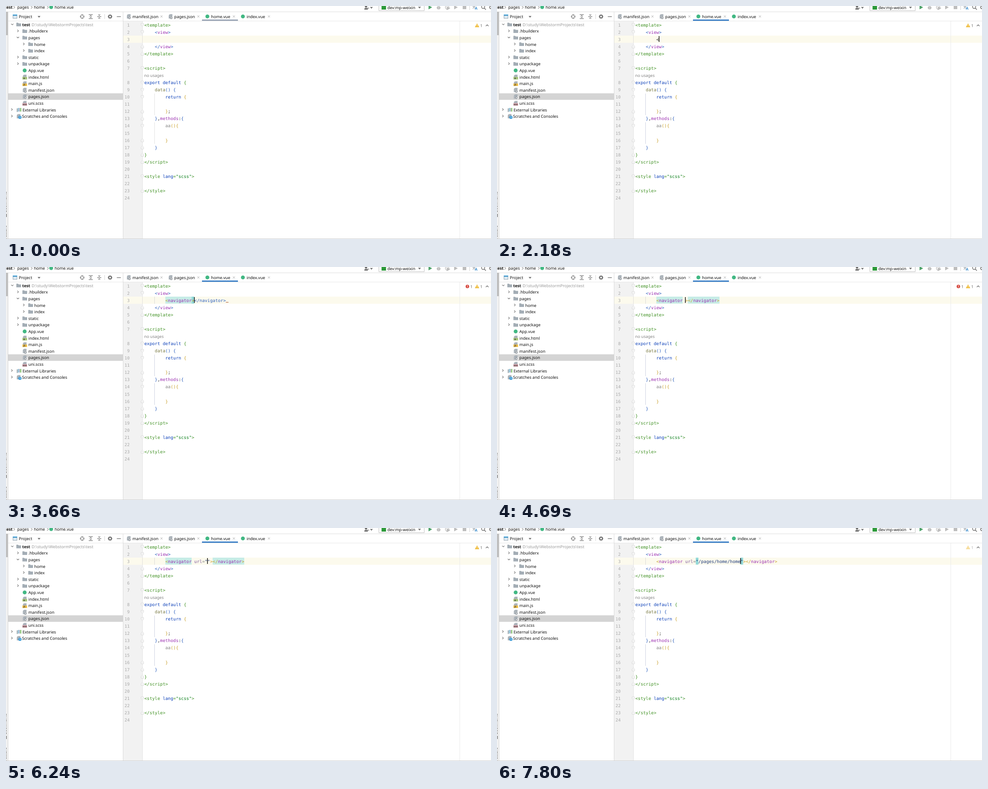
An HTML page with a canvas for the animation above (8 s loop, 1079 by 519 pixels).

```html
<!DOCTYPE html>
<html lang="en">
<head>
<meta charset="utf-8">
<title>Editor typing demo</title>
<style>
html, body { margin: 0; width: 100%; height: 100%; overflow: hidden; background: #fff; }
canvas { display: block; }
</style>
</head>
<body>
<canvas id="stage" width="1079" height="519"></canvas>
<script>
const ctx = document.getElementById('stage').getContext('2d');
const LOOP = 8000, W = 1079, H = 519;
const UI = '"Noto Sans", "Open Sans", sans-serif';
const MONO = '"DejaVu Sans Mono", monospace';
const CELL = 5.85, CODE_X = 307.7, ROW_H = 16.07;
const INK = {
  g: '#3f9022', b: '#2c5fbd', a: '#c9a02c', p: '#9b2fb0', k: '#0b3fb8',
  d: '#222', o: '#7a7a43', y: '#858585', s: '#067d17', n: '#1f3a7a', u: '#7f5a9c'
};

const colX = col => CODE_X + col * CELL;
const rowY = row => 42 + row * ROW_H;

// ---------- drawing helpers ----------
function rect(x, y, w, h, color) {
  ctx.fillStyle = color;
  ctx.fillRect(x, y, w, h);
}
function path(points, color, fill, width = 1) {
  ctx.beginPath();
  points.forEach(([x, y], i) => i ? ctx.lineTo(x, y) : ctx.moveTo(x, y));
  if (fill) { ctx.closePath(); ctx.fillStyle = color; ctx.fill(); }
  else { ctx.strokeStyle = color; ctx.lineWidth = width; ctx.stroke(); }
}
function dot(x, y, r, color, width) {
  ctx.beginPath();
  ctx.arc(x, y, r, 0, 7);
  if (width) { ctx.strokeStyle = color; ctx.lineWidth = width; ctx.stroke(); }
  else { ctx.fillStyle = color; ctx.fill(); }
}
function label(str, x, y, color = '#111', size = 9.1, weight = '') {
  ctx.font = `${weight} ${size}px ${UI}`;
  ctx.fillStyle = color;
  ctx.fillText(str, x, y + size * 0.36);
}
// Monospaced text, one glyph per grid cell.
function mono(str, x, y, color) {
  ctx.font = `9.7px ${MONO}`;
  ctx.fillStyle = color;
  [...str].forEach((ch, i) => ch !== ' ' && ctx.fillText(ch, x + i * CELL, y + 3.5));
}
// Segments are split by "~"; the first letter of each picks its ink.
function code(segments, col, row) {
  if (!segments) return;
  for (const seg of segments.split('~')) {
    mono(seg.slice(1), colX(col), rowY(row), INK[seg[0]]);
    col += seg.length - 1;
  }
}
const plain = segments => segments.split('~').map(s => s.slice(1)).join('');

function chevron(x, y, dir, color = '#6e6e6e', s = 2.5) {
  const pts = {
    right: [[-s / 2, -s], [s / 2, 0], [-s / 2, s]],
    down: [[-s, -s / 2], [0, s / 2], [s, -s / 2]],
    up: [[-s, s / 2], [0, -s / 2], [s, s / 2]]
  }[dir];
  path(pts.map(([a, b]) => [x + a, y + b]), color, false, 1.1);
}
const caretDown = (x, y) => path([[x - 3.2, y - 1.8], [x + 3.2, y - 1.8], [x, y + 2]], '#6e6e6e', true);
const playMark = (x, y, color) => path([[x - 3.5, y - 4.5], [x + 4.5, y], [x - 3.5, y + 4.5]], color, true);
function cross(x, y) {
  path([[x - 2.3, y - 2.3], [x + 2.3, y + 2.3]], '#b0b0b0');
  path([[x + 2.3, y - 2.3], [x - 2.3, y + 2.3]], '#b0b0b0');
}
function folder(x, y) {
  path([[x, y - 4], [x + 4, y - 4], [x + 5.3, y - 2.6], [x + 10.5, y - 2.6], [x + 10.5, y + 4], [x, y + 4]], '#a3adb5', true);
}
function icon(kind, x, y) {
  if (kind === 'folder') return folder(x, y);
  if (kind === 'vue') return dot(x + 5, y, 4.3, '#41b883');
  if (kind === 'libs') {
    ['#8f9aa3', '#62a7c9', '#8f9aa3', '#62b543'].forEach((c, i) => rect(x + i * 2.7, y - 4 + (i === 0), 1.7, 8, c));
    return;
  }
  path([[x + 4, y - 5], [x + 9.2, y - 5], [x + 9.2, y + 4.5], [x + 1, y + 4.5], [x + 1, y - 2]], '#aab2b9', true);
  path([[x + 1, y - 3], [x + 3.2, y - 5], [x + 3.2, y - 3]], '#aab2b9', true);
  if (kind === 'scratch') {
    dot(x + 8, y + 2.3, 3.6, '#3d9bd6');
    path([[x + 8, y + 0.5], [x + 8, y + 2.6], [x + 9.6, y + 2.6]], '#fff', false, 0.8);
  } else if (kind === 'json') {
    rect(x + 4, y - 0.5, 6.5, 6, '#f4f4f4');
    label('{}', x + 3.8, y + 2, '#55606a', 7, 'bold');
  } else {
    const [text, bg] = { html: ['H', '#a9c77c'], js: ['JS', '#f0c04a'], scss: ['SASS', '#d9a5ad'] }[kind];
    rect(x, y, 10.5, 5.5, bg);
    label(text, x + (text.length > 2 ? 0.4 : 2), y + 2.7, '#333', text.length > 2 ? 4 : 5, 'bold');
  }
}

// ---------- static content ----------
const TREE = [
  ['down', 14, 'folder', 23, ''],
  ['right', 26.5, 'folder', 36.5, '.hbuilderx'],
  ['down', 26.5, 'folder', 36.5, 'pages'],
  ['right', 39.5, 'folder', 49.5, 'home'],
  ['right', 39.5, 'folder', 49.5, 'index'],
  ['right', 26.5, 'folder', 36.5, 'static'],
  ['right', 26.5, 'folder', 36.5, 'unpackage'],
  ['', 0, 'vue', 36.5, 'App.vue'],
  ['', 0, 'html', 36.5, 'index.html'],
  ['', 0, 'js', 36.5, 'main.js'],
  ['', 0, 'json', 36.5, 'manifest.json'],
  ['', 0, 'json', 36.5, 'pages.json'],
  ['', 0, 'scss', 36.5, 'uni.scss'],
  ['right', 13, 'libs', 24, 'External Libraries'],
  ['right', 13, 'scratch', 23, 'Scratches and Consoles']
];
const TABS = [['json', 268, 'manifest.json', 346], ['json', 361, 'pages.json', 428],
  ['vue', 443, 'home.vue', 507], ['vue', 522, 'index.vue', 585]];
// row, column, segments
const CODE = [
  [0, 0, 'g<template>'], [1, 4, 'b<~pview~b>'], [3, 4, 'b</~pview~b>'], [4, 0, 'g</template>'],
  [6, 0, 'g<script>'], [8, 0, 'kexport default ~g{'], [9, 4, 'odata~b() {'], [10, 8, 'kreturn ~a{'],
  [12, 8, 'a}~d;'], [13, 4, 'b}~d,~pmethods~d:~b{'], [14, 8, 'yaa~a(){'], [16, 8, 'a}'],
  [17, 4, 'b}'], [18, 0, 'g}'], [19, 0, 'g<\/script>'],
  [21, 0, 'g<style ~klang~g=~s"scss"~g>'], [23, 0, 'g</style>']
];
const FOLD_OPEN = [0, 1, 6, 8, 9, 10, 14, 21];
const FOLD_CLOSE = [3, 4, 12, 13, 16, 17, 18, 19, 23];

function drawTopBar() {
  rect(0, 12.5, W, 1, '#dcdcdc');
  label('test', -3, 3, '#111', 9, 'bold');
  label('pages', 25, 3);
  label('home', 62, 3);
  label('home.vue', 108, 3);
  [18, 57, 93].forEach(x => chevron(x, 3, 'right', '#9a9a9a', 3.2));
  icon('vue', 95.5, 2.5);

  dot(801, 1, 2.6, '#6e6e6e');
  path([[797, 8], [798, 4.5], [804, 4.5], [805.5, 8]], '#6e6e6e', true);
  rect(804, 4, 4, 1.3, '#6e6e6e');
  caretDown(813, 4);
  path([[829.5, -2], [829.5, 10.5], [930.5, 10.5], [930.5, -2]], '#c0c0c0');
  rect(835.5, -1, 10, 9, '#2b9939');
  label('dev:mp-weixin', 848.5, 3.3);
  caretDown(920, 3.5);
  playMark(943.5, 3, '#4fa36b');
  const dim = '#bdbdbd';
  dot(962.5, 4, 3.7, dim);
  path([[957.5, 4], [967.5, 4]], dim);
  path([[962.5, -1], [962.5, 8]], '#e4e4e4', false, 0.8);
  dot(981.5, 3, 4, dim, 1.4);
  playMark(984, 5, dim);
  playMark(1000.5, 3, dim);
  rect(1016, -1, 8, 8, dim);
  rect(1031, 0, 1, 9, '#d4d4d4');
  ctx.font = '7px "Noto Sans CJK SC", "Noto Sans CJK", sans-serif';
  ctx.fillStyle = '#5f6b75';
  ctx.fillText('文', 1037.5, 5);
  label('A', 1043, 5, '#3d8fd1', 8.5, 'bold');
  dot(1061.5, 2, 3.5, '#6e6e6e', 1.4);
  path([[1064, 4.5], [1067.5, 8.3]], '#6e6e6e', false, 1.6);
  dot(1079, 3, 3, '#6e6e6e', 1.5);
}

function drawProject() {
  rect(0, 13, 5, H - 13, '#f2f2f2');
  rect(0, 13, 4, 52, '#bfbfbf');
  rect(4, 13, 1, H - 13, '#d1d1d1');
  for (const [text, y] of [['Bookmarks', 460], ['Structure', 527]]) {
    ctx.save();
    ctx.translate(1.5, y);
    ctx.rotate(-Math.PI / 2);
    label(text, 0, -3.2, '#333', 8.8);
    ctx.restore();
  }
  rect(0, 463, 1.5, 7, '#777');

  rect(15, 19, 10, 9, '#9aa7b0');
  rect(16, 22, 8, 5, '#dcebf5');
  rect(15, 19, 10, 2.5, '#45a0d6');
  label('Project', 28.5, 23.7);
  caretDown(73.5, 24);
  const c = '#6e6e6e';
  dot(169.5, 23.5, 4, c, 1.1);
  path([[169.5, 18.5], [169.5, 22]], c); path([[169.5, 25], [169.5, 28.5]], c);
  path([[164.5, 23.5], [168, 23.5]], c); path([[171, 23.5], [174.5, 23.5]], c);
  rect(184, 18.5, 9, 1.2, c); rect(184, 27.5, 9, 1.2, c);
  chevron(188.5, 22, 'up', c, 2); chevron(188.5, 25.3, 'down', c, 2);
  rect(203, 23, 9, 1.2, c);
  chevron(207.5, 20, 'down', c, 2); chevron(207.5, 27, 'up', c, 2);
  rect(219, 18, 1, 11, '#d4d4d4');
  dot(231.5, 23.5, 3, c, 2.2);
  for (let i = 0; i < 8; i++) {
    const a = i * Math.PI / 4;
    dot(231.5 + 4.2 * Math.cos(a), 23.5 + 4.2 * Math.sin(a), 0.9, c);
  }
  rect(246.5, 23, 9, 1.3, c);

  rect(5, 194.5, 255, 14.5, '#d4d4d4');
  TREE.forEach(([dir, dx, kind, ix, text], i) => {
    const y = 41.3 + i * 14.6;
    if (dir) chevron(dx, y - 0.5, dir);
    icon(kind, ix, y);
    label(text, ix + (ix > 30 ? 13.3 : 12.7), y + 0.3);
  });
  label('test', 36, 41.6, '#111', 9, 'bold');
  label('D:\\study\\WebstormProjects\\test', 57, 41.6, '#999');
}

function drawTabs(focused) {
  rect(5, 33, W - 5, 0.7, '#dcdcdc');
  for (const [kind, x, text, cx] of TABS) {
    icon(kind, x, 23.3);
    label(text, x + 13.3, 23.6);
    cross(cx, 23.3);
  }
  rect(436, 30, 80, 3, focused ? '#4083c9' : '#9ca7b8');
}

function foldMark(row, closing) {
  const y = rowY(row), s = closing ? -1 : 1;
  const pts = [[-2.8, -3.2], [2.8, -3.2], [2.8, 0.8], [0, 3.4], [-2.8, 0.8], [-2.8, -3.2]]
    .map(([a, b]) => [303.3 + a, y + b * s]);
  path(pts, '#fff', true);
  path(pts, '#cfcfcf', false, 0.8);
  rect(301.8, y - 0.4, 3, 0.8, '#cfcfcf');
}

function drawEditor(s) {
  rect(260, 34, 43, H - 34, '#f2f2f2');
  rect(260, 66, W - 260, 16, '#fcfaed');
  rect(303, 34, 0.8, H - 34, '#dadada');
  rect(260, 13, 0.8, H - 13, '#d4d4d4');
  rect(1009, 34, 1, H - 34, '#ebebeb');
  ctx.textAlign = 'right';
  ctx.font = `9.3px ${MONO}`;
  ctx.fillStyle = '#a8a8a8';
  for (let n = 1; n <= 24; n++) ctx.fillText(n, 275, rowY(n < 8 ? n - 1 : n) + 3.5);
  ctx.textAlign = 'left';
  FOLD_OPEN.forEach(r => foldMark(r, false));
  FOLD_CLOSE.forEach(r => foldMark(r, true));
  const guide = s.guide ? '#cdd3e2' : '#e2e2e2';
  rect(330, 195, 1, 48, guide);
  rect(330, 259, 1, 48, guide);
  if (s.lineGuide) rect(330, 66, 1, 16, '#dadada');
  label('no usages', 307.5, 154.8, '#808080', 9);
  CODE.forEach(([row, col, segs]) => code(segs, col, row));
}

function drawLine(s) {
  const len = plain(s.line).length;
  const band = (col, n, color) => rect(colX(8 + col), 66, n * CELL, 15.5, color);
  if (s.open) band(0, 10, '#c6ece6');
  if (s.close) band(len - 12, 12, '#c6ece6');
  s.match.forEach(col => band(col, 1, '#93d9d9'));
  code(s.line, 8, 2);
  if (s.mark) rect(colX(8 + s.mark), 78, CELL, 1.1, '#b0603c');
  if (s.caret !== null) rect(colX(8 + s.caret) - 0.5, 67, 1.4, 13, '#000');
  if (s.bulb) {
    dot(318, 58, 3.5, '#f2bf3c');
    rect(316.3, 62, 3.4, 1, '#8a8a8a');
    rect(316.8, 63.6, 2.4, 1, '#8a8a8a');
  }
}

function drawBadges(s) {
  if (s.err) {
    dot(1026.5, 43.3, 3.9, '#d6493f');
    rect(1026, 40.8, 1.1, 3.1, '#fff');
    rect(1026, 44.8, 1.1, 1.1, '#fff');
    label('1', 1033, 43.7, '#666', 8.8);
  }
  ctx.globalAlpha = s.warn;
  path([[1048, 38.8], [1052.8, 47.3], [1043.2, 47.3]], '#eeb72e', true);
  rect(1047.5, 41.5, 1.1, 2.8, '#fff');
  rect(1047.5, 45.2, 1.1, 1.1, '#fff');
  label('1', 1055, 43.7, '#666', 8.8);
  ctx.globalAlpha = 1;
  chevron(1070.5, 43.3, 'up', '#555', 3);
}

function drawPopup({ col, kind, items }, pick) {
  const step = 14.9, full = items.length > 3;
  const x = colX(8 + col) - (kind ? 20.5 : 5.5), y = 81;
  const listH = full ? 169 : items.length * step;
  ctx.save();
  ctx.shadowColor = 'rgba(0,0,0,.18)';
  ctx.shadowBlur = 3;
  rect(x, y - 0.5, 365.5, listH + 18, '#b8b8b8');
  ctx.restore();
  rect(x + 0.8, y, 363.9, listH + 16.8, '#f7f7f7');
  ctx.save();
  ctx.beginPath();
  ctx.rect(x + 0.8, y, 363.9, listH);
  ctx.clip();
  rect(x + 0.8, y + pick * step, 363.9, step, '#d9d9d9');
  items.forEach((text, i) => {
    const cy = y + (i + 0.5) * step + 0.5;
    if (kind === 'tag') {
      path([[x + 9, cy - 2.8], [x + 6.3, cy], [x + 9, cy + 2.8]], '#6e7a84');
      path([[x + 12, cy - 2.8], [x + 14.7, cy], [x + 12, cy + 2.8]], '#6e7a84');
    } else if (kind === 'attr') dot(x + 10.5, cy, 3.8, '#b99bd0', 1.4);
    mono(text, x + (kind ? 20.5 : 5.3), cy, '#111');
  });
  ctx.restore();
  const hy = y + listH + 8.6;
  label('Press Ctrl+. to choose the selected (or first) suggestion and insert a dot afterwards', x + 8, hy, '#8a8a8a', 7.35);
  label('Next Tip', x + 296.3, hy, '#3f73b0', 7.35);
  [-3.7, 0, 3.7].forEach(d => dot(x + 357, hy + d, 1, '#6e6e6e'));
}

// ---------- timeline ----------
const words = str => str.split(' ');
const TAGS = { col: 1, kind: 'tag', items: words('view text image button navigator template slot component block input form label') };
const TAGS_N = { col: 1, kind: 'tag', items: words('navigator nav noscript input button canvas image picker-view transition component section span') };
const ATTRS = { col: 11, kind: 'attr', items: words('url class style id open-type delta hover-class v-if v-for v-bind v-on v-show') };
const ATTRS_U = { col: 11, kind: 'attr', items: words('url aria-busy aria-current @mouseup @mouseout @mouseover @input @focus @submit @touchmove @pause @blur') };
const PATHS = { col: 16, kind: '', items: ['/pages/index/index', '/pages/home/home'] };
const nav = attr => `a<~pnavigator~${attr}~a></~pnavigator~a>`;

const STEPS = [
  [0, { line: '', caret: null, focus: false, warn: 1, err: false, guide: false, lineGuide: false,
        popup: null, pick: 0, open: false, close: false, match: [], bulb: false, mark: 0 }],
  [400, { guide: true, warn: 0.5 }],
  [880, { focus: true }],
  [950, { caret: 0 }],
  [1490, { caret: null }],
  [1550, { warn: 1 }],
  [1820, { bulb: true }],
  [2020, { bulb: false, line: 'd<', caret: 1 }],
  [2310, { popup: TAGS }],
  [2640, { line: 'd<~pn', caret: 2 }],
  [2710, { popup: TAGS_N }],
  [3120, { line: 'd<~pna', caret: 3 }],
  [3330, { line: 'a<~pnavigator', caret: 10, popup: null, lineGuide: true }],
  [3530, { line: 'a<~pnavigator~a>~b</navigator>', caret: 11, open: true, match: [10] }],
  [3600, { err: true, mark: 23 }],
  [3730, { line: nav('d'), close: true }],
  [4060, { caret: null }],
  [4390, { caret: 10, match: [] }],
  [4620, { line: nav('d '), caret: 11, mark: 24 }],
  [4690, { mark: 0 }],
  [4830, { popup: ATTRS }],
  [5220, { popup: null }],
  [5550, { line: nav('d ~uu'), caret: 12 }],
  [5620, { err: false }],
  [5690, { popup: ATTRS_U }],
  [6240, { line: nav('d ~uurl~y=~n""'), caret: 16, popup: null }],
  [6310, { match: [15, 16] }],
  [6380, { popup: PATHS }],
  [6580, { warn: 0.5 }],
  [7130, { caret: null }],
  [7460, { caret: 16 }],
  [7590, { pick: 1 }],
  [7730, { line: nav('d ~uurl~y=~n"/pages/home/home"'), caret: 32, match: [15, 32], popup: null }],
  [7800, { open: false, close: false }]
];
const stateAt = t => Object.assign({}, ...STEPS.filter(([at]) => at <= t).map(([, patch]) => patch));

function draw(t) {
  const s = stateAt(t);
  ctx.textRendering = 'geometricPrecision';
  rect(0, 0, W, H, '#fff');
  drawEditor(s);
  drawTopBar();
  drawTabs(s.focus);
  drawProject();
  drawLine(s);
  drawBadges(s);
  if (s.popup) drawPopup(s.popup, s.pick);
  rect(0, 518, W, 1, '#cfcfcf');
}

const start = performance.now();
function tick() {
  draw((performance.now() - start) % LOOP);
  requestAnimationFrame(tick);
}
draw(0);
requestAnimationFrame(tick);
</script>
</body>
</html>
```
